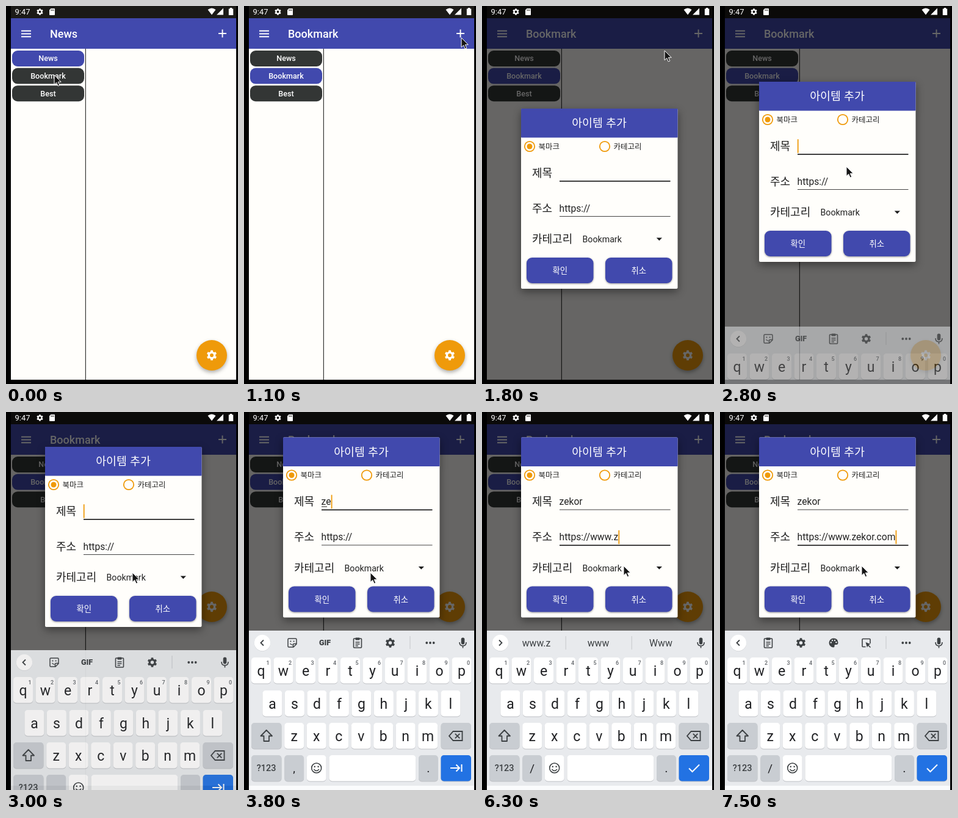
Write an HTML page that moves like this. It is 380 px wide and 619 px high and loops after 8000 ms.

```html
<!DOCTYPE html>
<html lang="ko">
<head>
<meta charset="utf-8">
<title>Bookmark app</title>
<style>
  html, body { margin: 0; width: 100%; height: 100%; overflow: hidden; background: #000; }
  svg { display: block; width: 100%; height: 100%; }
  text { font-family: Roboto, "Noto Sans CJK KR", "Noto Sans CJK JP", sans-serif; white-space: pre; }
  .ko { font-family: "Noto Sans CJK KR", "Noto Sans CJK JP", sans-serif; }
  #dialog { filter: drop-shadow(0 5px 7px rgba(0, 0, 0, .42)); }
  .lift { filter: drop-shadow(0 1px 1.5px rgba(0, 0, 0, .4)); }
  #fab { filter: drop-shadow(0 3px 3px rgba(0, 0, 0, .32)); }
</style>
</head>
<body>
<svg id="stage" viewBox="0 0 380 619" preserveAspectRatio="none"></svg>
<script>
const LOOP = 8000;
const BLUE = '#4149ad', ORANGE = '#ef9a0a', DARK = '#333635', PAPER = '#fffefb', INK = '#3c4043';
const stage = document.getElementById('stage');

// ---------- drawing helpers ----------
function el(parent, tag, attrs = {}, text) {
  const node = document.createElementNS('http://www.w3.org/2000/svg', tag);
  for (const key in attrs) node.setAttribute(key, attrs[key]);
  if (text !== undefined) node.textContent = text;
  parent.append(node);
  return node;
}
const group = (parent, attrs) => el(parent, 'g', attrs);
const rect = (parent, x, y, width, height, fill, rx = 0, more) =>
  el(parent, 'rect', { x, y, width, height, fill, rx, ...more });
const circle = (parent, cx, cy, r, fill, more) => el(parent, 'circle', { cx, cy, r, fill, ...more });
const fill = (parent, d, color, more) => el(parent, 'path', { d, fill: color, ...more });
const line = (parent, d, color, width, more) =>
  el(parent, 'path', { d, fill: 'none', stroke: color, 'stroke-width': width, ...more });
const label = (parent, x, y, size, color, text, more) =>
  el(parent, 'text', { x, y, 'font-size': size, fill: color, ...more }, text);
const MID = { 'text-anchor': 'middle' };
const KO = { class: 'ko' };
const move = (node, x, y) => node.setAttribute('transform', `translate(${x} ${y})`);
const show = (node, on) => node.setAttribute('visibility', on ? 'visible' : 'hidden');

// Icons are drawn around their own centre.
const place = (parent, x, y, scale = 1) =>
  group(parent, { transform: `translate(${x} ${y}) scale(${scale})` });

function gear(parent, x, y, size, color) {
  const g = place(parent, x, y, size / 20);
  circle(g, 0, 0, 5.4, 'none', { stroke: color, 'stroke-width': 3.9 });
  for (let i = 0; i < 6; i++)
    rect(g, -2.3, -9.6, 4.6, 4, color, .5, { transform: `rotate(${i * 60})` });
}
function clipboard(parent, x, y) {
  const g = place(parent, x, y);
  rect(g, -6.5, -7, 13, 15, 'none', 1, { stroke: INK, 'stroke-width': 1.6 });
  rect(g, -3.5, -8.5, 7, 4, INK, 1);
  line(g, 'M-3.5-1H3.5M-3.5 2H3.5M-3.5 5H1', INK, 1.4);
}
function sticker(parent, x, y) {
  const g = place(parent, x, y);
  line(g, 'M-5.5-7H5.5Q7-7 7-5.5V2L2 7H-5.5Q-7 7-7 5.5V-5.5Q-7-7-5.5-7ZM7 1.5H3Q1.5 1.5 1.5 3V7', INK, 1.5);
  circle(g, -2.6, -2.5, 1.1, INK);
  circle(g, 2.6, -2.5, 1.1, INK);
  line(g, 'M-3.5 1Q-2 3.5 .5 3', INK, 1.3);
}
function palette(parent, x, y) {
  const g = place(parent, x, y);
  fill(g, 'M0-7.5A7.5 7.5 0 0 0 0 7.5Q2 7.3 1.5 5Q1 3 3 3H5Q7.5 2.8 7.5-.5Q7-7.5 0-7.5Z', INK);
  for (const [cx, cy] of [[-4.2, -.5], [-2, -4], [2, -4], [4.4, -.8]]) circle(g, cx, cy, 1.2, '#e8eaed');
}
function pointerBox(parent, x, y) {
  const g = place(parent, x, y);
  line(g, 'M-1 6.5H-5.5Q-6.5 6.5-6.5 5.5V-5.5Q-6.5-6.5-5.5-6.5H5.5Q6.5-6.5 6.5-5.5V1', INK, 1.6);
  fill(g, 'M-1-1L7 2L4 3.5L7.5 7L6.5 8L3 4.8L1.5 7.5Z', INK);
}
function pillButton(parent, x, y, w, h, color, r) {
  return rect(parent, x, y, w, h, color, r);
}

// ---------- app screen ----------
rect(stage, 0, 0, 380, 619, '#000');
const app = group(stage);
rect(app, 8, 0, 369, 612, PAPER);
rect(app, 8, 0, 369, 20, '#1b1a17');
rect(app, 8, 20, 369, 50, BLUE);
line(app, 'M25 40.7H41M25 45.5H41M25 50.3H41', '#fff', 1.9);
line(app, 'M348 45H361M354.5 38.5V51.5', '#fff', 1.9);
const ripple = circle(app, 354.5, 45, 18, '#fff', { opacity: .2 });
const heading = label(app, 72, 52, 18, '#fff', 'News', { 'font-weight': 500 });
rect(app, 129.8, 70, 1.1, 542, '#222');
const tabs = ['News', 'Bookmark', 'Best'].map((name, i) => {
  const y = 73 + i * 28.6;
  const back = pillButton(app, 10, y, 118, 26, DARK, 9);
  label(app, 69, y + 17.4, 12.6, '#fff', name, { ...MID, 'font-weight': 500 });
  return back;
});
const fab = group(app, { id: 'fab' });
circle(fab, 0, 0, 25, ORANGE);
gear(fab, 0, 0, 17, '#fff');

const scrim = rect(stage, 8, 0, 369, 612, '#000');

// status bar icons stay bright
label(stage, 14.5, 14.3, 13, '#fff', '9:47');
gear(stage, 55.5, 9.5, 11, '#fff');
fill(stage, 'M73.5 4H79Q80 4 80 5V14Q80 15 79 15H72Q71 15 71 14V6.5Z', '#fff');
line(stage, 'M74 5.5V8M76 5.5V8M78 5.5V8', '#1b1a17', .9);
fill(stage, 'M330.5 6Q337 .8 343.5 6L337 14.5Z', '#fff');
fill(stage, 'M356 3.5V14.5H345Z', '#fff');
fill(stage, 'M364.8 4.5H366.8V3H370.2V4.5H372.2V15H364.8Z', '#fff');

// ---------- dialog ----------
const dialog = group(stage, { id: 'dialog' });
rect(dialog, 64, 0, 256.5, 295, PAPER, 2);
rect(dialog, 64, 0, 256.5, 47.5, BLUE, 1);
label(dialog, 192, 30.3, 18.4, '#fff', '아이템 추가', { ...MID, ...KO });
[[78, '북마크'], [201, '카테고리']].forEach(([x, text], i) => {
  circle(dialog, x, 62, 8.2, 'none', { stroke: ORANGE, 'stroke-width': 1.8 });
  if (!i) circle(dialog, x, 62, 4.5, ORANGE);
  label(dialog, x + 14.5, 66.5, 12.5, '#222', text, KO);
});
[['제목', 111.7], ['주소', 169.7], ['카테고리', 220]].forEach(([text, y]) =>
  label(dialog, 82, y, 18, '#1d1d1d', text, { ...KO, 'font-weight': 500 }));

function field(lineY) {
  return {
    rule: rect(dialog, 127, lineY, 181.5, 1, '#333'),
    text: label(dialog, 126.6, lineY - 7.2, 15.6, '#222', ''),
    lineY
  };
}
const titleField = field(118), urlField = field(176);
const composing = rect(dialog, 127, 113, 0, 1, '#222');
const caret = rect(dialog, 0, 0, 1.8, 22.5, ORANGE);
label(dialog, 164.5, 219, 14.2, '#222', 'Bookmark');
fill(dialog, 'M285.7 211.5H295L290.3 216.3Z', '#1d1d1d');
[[73, '확인'], [202, '취소']].forEach(([x, text]) => {
  pillButton(dialog, x, 244, 109.5, 42, BLUE, 9).setAttribute('class', 'lift');
  label(dialog, x + 54.7, 270, 13.4, '#fff', text, { ...MID, ...KO });
});
const handle = group(dialog);
circle(handle, 179, 186.3, 9, ORANGE);
fill(handle, 'M179 176L185 180H173Z', ORANGE);

// ---------- keyboard ----------
const keyboard = group(stage);
rect(keyboard, 8, 0, 369, 261, '#e8eaed');
rect(keyboard, 8, 254, 369, 7, '#fafbfc');
circle(keyboard, 30, 20.5, 13.2, '#c9cbce');
circle(keyboard, 30, 20, 13.2, '#fff');
const chevron = line(keyboard, 'M0 0', INK, 1.8);
const mic = place(keyboard, 358.5, 20);
rect(mic, -2.8, -8.5, 5.6, 11, INK, 2.8);
line(mic, 'M-5.5-1Q-5.5 5 0 5Q5.5 5 5.5-1M0 5V8.5', INK, 1.6);

function toolbar(icons) {
  const g = group(keyboard);
  icons.forEach((draw, i) => draw(g, 79 + i * 53.5, 20));
  rect(g, 271.5, 9, 1, 21, '#c6c8cb');
  for (let i = -1; i < 2; i++) circle(g, 305 + i * 5.7, 20, 1.9, INK);
  return g;
}
const smallGear = (g, x, y) => gear(g, x, y, 16, INK);
const gif = (g, x, y) => label(g, x, y + 4.3, 12.5, INK, 'GIF', { ...MID, 'font-weight': 900 });
const toolsA = toolbar([sticker, gif, clipboard, smallGear]);
const toolsB = toolbar([clipboard, smallGear, palette, pointerBox]);
const hints = group(keyboard);
rect(hints, 136.7, 9, 1, 22, '#c6c8cb');
rect(hints, 244.7, 9, 1, 22, '#c6c8cb');
const hintTexts = [89, 190.5, 293].map(x => label(hints, x, 26, 15.8, INK, '', MID));

function key(x, y, w, color = '#fff') {
  rect(keyboard, x, y + 1, w, 42.5, '#bfc1c5', 5);
  rect(keyboard, x, y, w, 42.5, color, 5);
}
function letter(cx, y, ch) {
  key(cx - 16, y, 32, '#fff');
  label(keyboard, cx, y + 30, 23, '#202124', ch, MID);
}
[['qwertyuiop', 28, 44], ['asdfghjkl', 46.4, 98], ['zxcvbnm', 82.2, 151]].forEach(([row, x, y], r) =>
  [...row].forEach((ch, i) => {
    letter(x + i * 36.5, y, ch);
    if (!r) label(keyboard, x + i * 36.5 + 11, y + 12, 9, '#5f6368', (i + 1) % 10, { ...MID, 'font-weight': 500 });
  }));
const GREY = '#c9cdd2';
key(12, 151, 49.5, GREY);
key(322.5, 151, 49.5, GREY);
key(12, 204, 49.5, GREY);
key(66.3, 204, 31.8, GREY);
key(102.8, 204, 31.8);
key(139.5, 204, 141.8);
key(286, 204, 31.8, GREY);
key(322.5, 204, 49.5, '#2272e3');
line(keyboard, 'M36.7 163L46 172.5H41V181H32.5V172.5H27.5Z', INK, 1.8, { 'stroke-linejoin': 'round' });
line(keyboard, 'M342.5 165H357.5V180H342.5L336 172.5ZM345.8 168.8L353.3 176.3M353.3 168.8L345.8 176.3', INK, 1.8);
label(keyboard, 36.7, 230.3, 14.5, INK, '?123', { ...MID, 'font-weight': 500 });
const sideKey = label(keyboard, 82.2, 232, 19, '#202124', ',', MID);
label(keyboard, 301.8, 232, 20, '#202124', '.', MID);
circle(keyboard, 118.7, 225, 8, 'none', { stroke: INK, 'stroke-width': 1.6 });
circle(keyboard, 115.8, 222.7, 1.2, INK);
circle(keyboard, 121.6, 222.7, 1.2, INK);
line(keyboard, 'M114.3 227Q118.7 232 123.1 227', INK, 1.5);
const enterIcon = line(keyboard, 'M0 0', '#fff', 2);

const cursor = group(stage);
fill(cursor, 'M0 0V15.6L3.7 12.2L6.2 18L8.7 17L6.3 11.3H11.2Z', '#151515',
  { stroke: '#fff', 'stroke-width': 1, 'stroke-linejoin': 'round' });

// ---------- timeline: [start ms, value...] ----------
const pointer = [
  [0, 79, 113], [100, 86, 121], [600, 120, 112], [800, 258, 86], [900, 366, 70], [1100, 356, 52],
  [1200, 350, 39], [1700, 331, 50], [1800, 299, 73], [1900, 310, 174], [2100, 292, 203], [2200, 262, 229],
  [2300, 234, 248], [2400, 214, 259], [2500, 207, 263], [4700, 208, 252], [4800, 212, 231],
  [4900, 217, 213], [5000, 219, 205], [5600, 226, 231], [5700, 232, 252]
];
const dim = [[0, 0], [1600, .11], [1700, .4], [1800, .6]];
const dialogTop = [[0, 168], [2800, 124], [2900, 82], [3000, 57], [3100, 45], [3200, 41.5]];
const keys = [[0, 619, 0], [2800, 525, .5], [2900, 443, .75], [3000, 390, .9], [3100, 365, 1], [3200, 358, 1]];
const name = 'zekor', address = 'www.' + name + '.com';
const nameTyped = [[0, 0], [3800, 2], [4200, 3], [4400, 4], [4600, 5]];
const addressTyped = [
  [0, 0], [5700, 1], [5800, 2], [6000, 3], [6200, 4], [6300, 5], [6500, 6], [6700, 7],
  [6900, 8], [7000, 9], [7200, 10], [7300, 11], [7400, 12], [7500, 13]
];
const suggestions = [
  [0, '', '', ''], [4000, 'ze', 'zero', 'zest'], [4200, 'zek', 'Zek', 'zeal'], [4400, 'zeko', 'Zeko', 'zero'],
  [4600, 'zekor', 'Zekoon', 'Zekoda'], [5400, '', '', ''], [6000, 'www', 'WWW', 'wow'],
  [6200, 'www.', 'www', 'Www'], [6300, 'www.z', 'www', 'Www']
];
const at = (table, t) => table.findLast(row => row[0] <= t).slice(1);

function setField(f, text, focused) {
  f.text.textContent = text;
  f.rule.setAttribute('height', focused ? 1.6 : 1);
  f.rule.setAttribute('fill', focused ? '#111' : '#444');
}

function render(t) {
  const onBookmark = t >= 500;
  heading.textContent = onBookmark ? 'Bookmark' : 'News';
  tabs.forEach((tab, i) => tab.setAttribute('fill', i === +onBookmark ? BLUE : DARK));
  show(ripple, t >= 1500 && t < 1700);
  move(fab, 337, t < 2900 ? 572 : 319);
  scrim.setAttribute('opacity', at(dim, t)[0]);

  show(dialog, t >= 1600);
  move(dialog, 0, at(dialogTop, t)[0]);
  const onUrl = t >= 5100;
  const [typed] = at(nameTyped, t);
  setField(titleField, name.slice(0, typed), !onUrl);
  setField(urlField, 'https://' + address.slice(0, at(addressTyped, t)[0]), onUrl);
  const active = onUrl ? urlField : titleField;
  const end = active.text.textContent ? active.text.getComputedTextLength() : 0;
  caret.setAttribute('x', 126.8 + end);
  caret.setAttribute('y', active.lineY - 23.8);
  caret.setAttribute('opacity', t >= 2600 ? 1 : 0);
  composing.setAttribute('width', onUrl ? 0 : t < 4000 ? Math.min(end, 9) : end);
  handle.setAttribute('opacity', t >= 5100 && t < 5700 ? (t < 5400 ? .8 : 1) : 0);

  const [top, alpha] = at(keys, t);
  move(keyboard, 0, top);
  keyboard.setAttribute('opacity', alpha);
  const hinting = t >= 4000 && t < 6500;
  show(toolsA, t < 4000);
  show(hints, hinting);
  show(toolsB, t >= 6500);
  chevron.setAttribute('d', hinting ? 'M28 15.5L32.5 20L28 24.5' : 'M32 15.5L27.5 20L32 24.5');
  at(suggestions, t).forEach((word, i) => { hintTexts[i].textContent = word; });
  sideKey.textContent = t < 5400 ? ',' : '/';
  enterIcon.setAttribute('d', t < 5400
    ? 'M338 225H353M347.5 219.5L353 225L347.5 230.5M356.5 219V231'
    : 'M339 225.5L344.5 231L356 219.5');

  move(cursor, ...at(pointer, t));
}

const start = performance.now();
function tick() {
  render((performance.now() - start) % LOOP);
  requestAnimationFrame(tick);
}
tick();
</script>
</body>
</html>
```
